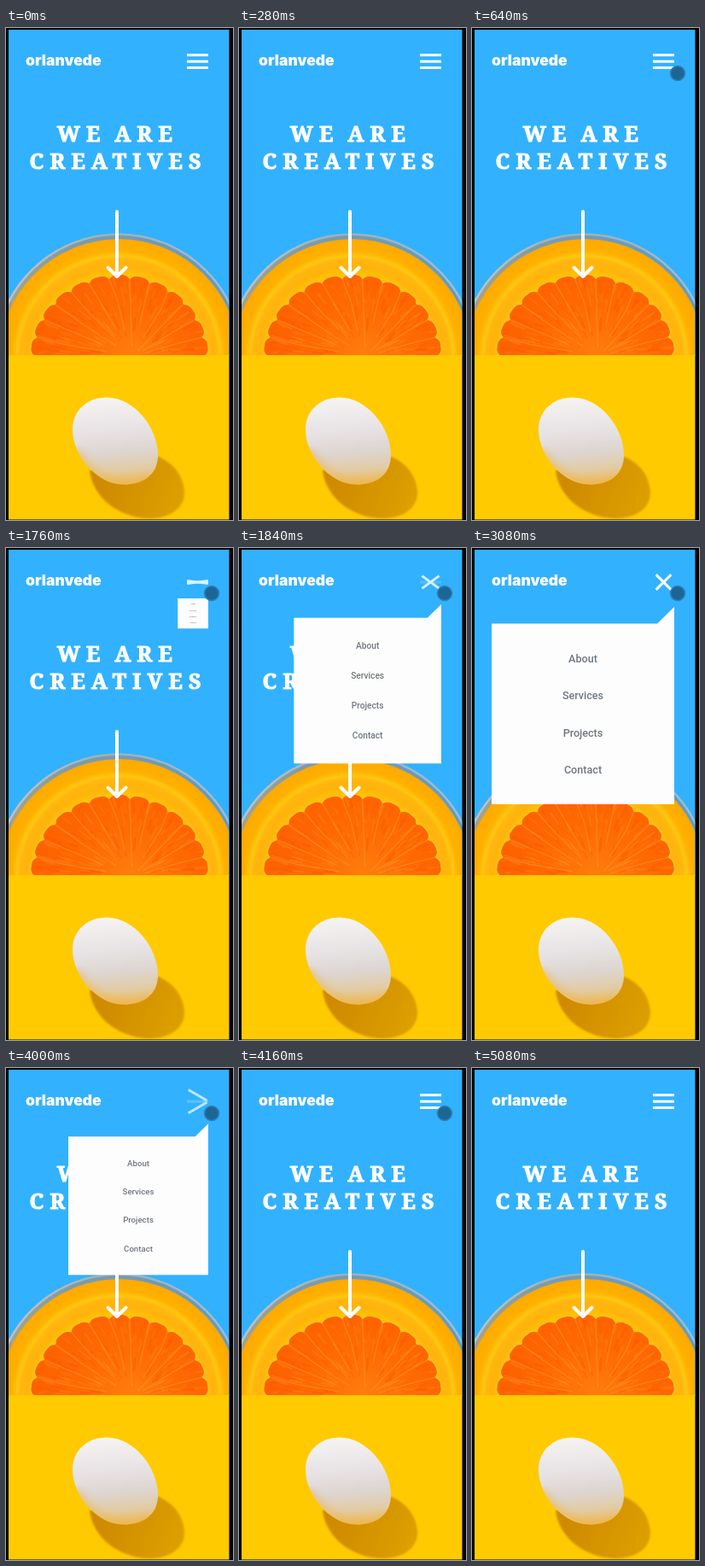
An HTML page that plays this animation: 266 px wide and 576 px high, repeating every 5160 ms.

```html
<!DOCTYPE html>
<html lang="en">
<head>
<meta charset="utf-8">
<title>Landing page menu</title>
<style>
  html, body { margin: 0; width: 100%; height: 100%; overflow: hidden; background: #000; }
  svg { display: block; }
  .logo { font: 900 17.5px Inter, sans-serif; fill: #fff; }
  .title { font: 900 25px "Noto Serif", serif; letter-spacing: 7.3px; word-spacing: -4px; fill: #fff; stroke: #fff; stroke-width: 1.1px; }
  .links { font: 500 12.6px Roboto, sans-serif; fill: #6f7880; text-anchor: middle; }
  .line { fill: none; stroke: #fff; stroke-linecap: round; stroke-linejoin: round; }
</style>
</head>
<body>
<svg width="266" height="576" viewBox="0 0 266 576">
  <defs>
    <clipPath id="page"><rect x="3" y="2" width="258.500" height="573.500"/></clipPath>
    <clipPath id="hero"><rect x="3" y="2" width="258.500" height="381"/></clipPath>
    <clipPath id="pulpClip"><path id="pulpEdge"/></clipPath>
    <clipPath id="eggClip"><path id="eggShape" d="M78 470C78 448 95 432.5 118 432.5C150 432.5 178 468 178 500C178 522 162 534.5 138 534.5C106 534.5 78 500 78 470Z"/></clipPath>
    <radialGradient id="rind" gradientUnits="userSpaceOnUse" cx="132" cy="386" r="142">
      <stop offset=".68" stop-color="#ffc400"/>
      <stop offset=".75" stop-color="#ffb30c"/>
      <stop offset=".81" stop-color="#ffb60e"/>
      <stop offset=".84" stop-color="#ffc710"/>
      <stop offset=".88" stop-color="#ffb000"/>
      <stop offset=".96" stop-color="#ffab00"/>
      <stop offset="1" stop-color="#f7a500"/>
    </radialGradient>
    <radialGradient id="pulp" gradientUnits="userSpaceOnUse" cx="146" cy="383" r="108">
      <stop offset="0" stop-color="#ff7d0c"/>
      <stop offset=".5" stop-color="#ff6a04"/>
      <stop offset="1" stop-color="#fd6200"/>
    </radialGradient>
    <linearGradient id="rim" x1="0" x2="1">
      <stop offset="0" stop-color="#c3c6c0"/>
      <stop offset=".45" stop-color="#9fb0b2"/>
      <stop offset="1" stop-color="#9dbfd8"/>
    </linearGradient>
    <linearGradient id="glass" x1="0" x2="1">
      <stop offset="0" stop-color="#a9a58c"/>
      <stop offset=".3" stop-color="#7b9cae"/>
      <stop offset="1" stop-color="#5c9cc8"/>
    </linearGradient>
    <linearGradient id="shade" gradientUnits="userSpaceOnUse" x1="115" y1="520" x2="205" y2="560">
      <stop offset="0" stop-color="#cf8a00"/>
      <stop offset="1" stop-color="#dca000"/>
    </linearGradient>
    <linearGradient id="egg" gradientUnits="userSpaceOnUse" x1="124" y1="432" x2="134" y2="536">
      <stop offset="0" stop-color="#f6f3f3"/>
      <stop offset=".4" stop-color="#e6e2e3"/>
      <stop offset=".62" stop-color="#ddd5d0"/>
      <stop offset=".82" stop-color="#e2cca6"/>
      <stop offset="1" stop-color="#edb95a"/>
    </linearGradient>
    <filter id="soft"><feGaussianBlur stdDeviation="1"/></filter>
    <filter id="glow"><feGaussianBlur stdDeviation="4"/></filter>
  </defs>

  <rect width="266" height="576"/>
  <g clip-path="url(#page)">
    <rect width="266" height="384" fill="#32b1ff"/>
    <g clip-path="url(#hero)">
      <circle cx="132" cy="386" r="144.500" fill="url(#glass)" stroke="url(#rim)" stroke-width="2.500"/>
      <circle cx="132.500" cy="387.500" r="140.500" fill="url(#rind)"/>
      <use href="#pulpEdge" fill="none" stroke="#ffc31c" stroke-width="4" filter="url(#soft)"/>
      <use href="#pulpEdge" fill="url(#pulp)"/>
      <g id="fibres" clip-path="url(#pulpClip)" fill="none" stroke-linecap="round"></g>
    </g>
    <rect y="383" width="266" height="193" fill="#ffca00"/>
    <path d="M98 518C102 552 135 574 168 574C195 574 210 560 209 542C207 522 195 508 176 501Z" fill="url(#shade)" filter="url(#soft)"/>
    <use href="#eggShape" fill="url(#egg)"/>
    <g clip-path="url(#eggClip)">
      <path d="M82 494C102 530 138 542 168 527" fill="none" stroke="#f0b440" stroke-opacity=".6" stroke-width="8" filter="url(#glow)"/>
    </g>

    <text class="logo" x="23" y="43.500">orlanvede</text>
    <text class="title" x="60" y="133">WE ARE</text>
    <text class="title" x="27.500" y="165">CREATIVES</text>
    <path class="line" stroke-width="4" d="M130 215V290M119.500 280.500L130 291L140.500 280.500"/>

    <g id="menu">
      <path d="M23 88.500H217L237 69V300H23Z" fill="#fdfdfe"/>
      <g id="links" class="links"></g>
    </g>
    <g id="icon" fill="#fff">
      <rect x="-12.500" y="-1.500" width="25" height="3"/>
      <rect x="-12.500" y="-1.500" width="25" height="3"/>
      <rect x="-12.500" y="-1.500" width="25" height="3"/>
    </g>
    <circle id="cursor" cx="241" cy="53" r="8.500" fill="#1d6694" stroke="#2b84bb" stroke-width="1.600"/>
  </g>
</svg>

<script>
const LOOP = 5160, OPEN = 1730, CLOSE = 3963;
const $ = id => document.getElementById(id);
const clamp = v => Math.min(1, Math.max(0, v));

function add(parent, tag, attrs, text = '') {
  const el = document.createElementNS('http://www.w3.org/2000/svg', tag);
  for (const key in attrs) el.setAttribute(key, attrs[key]);
  el.textContent = text;
  parent.append(el);
}

let seed = 17;
const rand = () => (seed = seed * 16807 % 2147483647) / 2147483647;

// Orange slice: a half ellipse with a notched, bulging edge.
const BULGES = 13;
const core = [148, 385];
const edge = a => {
  const r = 1 - 0.05 * (1 - Math.abs(Math.sin(a * BULGES))) ** 2;
  return [133 - 104 * r * Math.cos(a), 384 - 95 * r * Math.sin(a)];
};
const along = (a, k) => edge(a).map((v, i) => (core[i] + (v - core[i]) * k).toFixed(1));

function drawOrange() {
  const points = Array.from({ length: 181 }, (_, i) => edge(Math.PI * i / 180).map(v => v.toFixed(1)));
  $('pulpEdge').setAttribute('d', `M${points.join('L')}Z`);
  for (let i = 0; i < 170; i++) {
    const a = rand() * Math.PI, k = 0.25 + rand() * 0.65;
    add($('fibres'), 'path', {
      d: `M${along(a, k)}L${along(a + (rand() - 0.5) * 0.05, k + 0.06 + rand() * 0.1)}`,
      stroke: ['#ff8c22', '#f65200', '#ff7a10'][i % 3],
      'stroke-width': 1 + rand() * 2,
      'stroke-opacity': 0.35
    });
  }
  for (let i = 1; i < BULGES; i++) {
    const a = Math.PI * i / BULGES;
    add($('fibres'), 'path', {
      d: `M${along(a, 0.1 + rand() * 0.4)}L${along(a + (rand() - 0.5) * 0.08, 0.7)}L${along(a, 1)}`,
      stroke: '#ff9a28', 'stroke-width': 1.4, 'stroke-opacity': 0.5
    });
  }
}

// The CSS "ease" curve, solved by bisection.
function ease(x) {
  if (x <= 0 || x >= 1) return clamp(x);
  const curve = (s, a, b) => 3 * s * (1 - s) ** 2 * a + 3 * s * s * (1 - s) * b + s ** 3;
  let lo = 0, hi = 1;
  for (let i = 0; i < 20; i++) {
    const mid = (lo + hi) / 2;
    if (curve(mid, 0.25, 0.25) < x) lo = mid; else hi = mid;
  }
  return curve(lo, 0.1, 1);
}

const shown = (t, closeTime) =>
  t < CLOSE ? ease((t - OPEN) / 220) : 1 - ease((t - CLOSE) / closeTime);

function render(t) {
  const scale = shown(t, 220);
  $('menu').setAttribute('transform', `translate(237 53) scale(${scale}) translate(-237 -53)`);
  $('menu').style.display = scale > 0 ? '' : 'none';

  // Bars jump to their new rows at once; only the turn is eased.
  const turn = shown(t, 175);
  const crossed = t >= OPEN && t < CLOSE;
  const rows = crossed ? [40, 40, 40] : [31.7, 39.2, 46.5];
  [...$('icon').children].forEach((bar, i) => {
    bar.setAttribute('transform', `translate(224.5 ${rows[i]}) rotate(${45 * turn * (1 - i)})`);
    bar.style.opacity = i === 1 ? 1 - turn : 1;
  });
  $('icon').style.opacity = 1 - 0.35 * Math.sin(Math.PI * turn);

  $('cursor').style.opacity = t < 2000 ? clamp((t - 560) / 80) : 1 - clamp((t - 4640) / 120);
}

drawOrange();
['About', 'Services', 'Projects', 'Contact'].forEach((label, i) =>
  add($('links'), 'text', { x: 130, y: 133.5 + 43.5 * i }, label));

const start = performance.now();
function tick() {
  render((performance.now() - start) % LOOP);
  requestAnimationFrame(tick);
}
tick();
</script>
</body>
</html>
```
